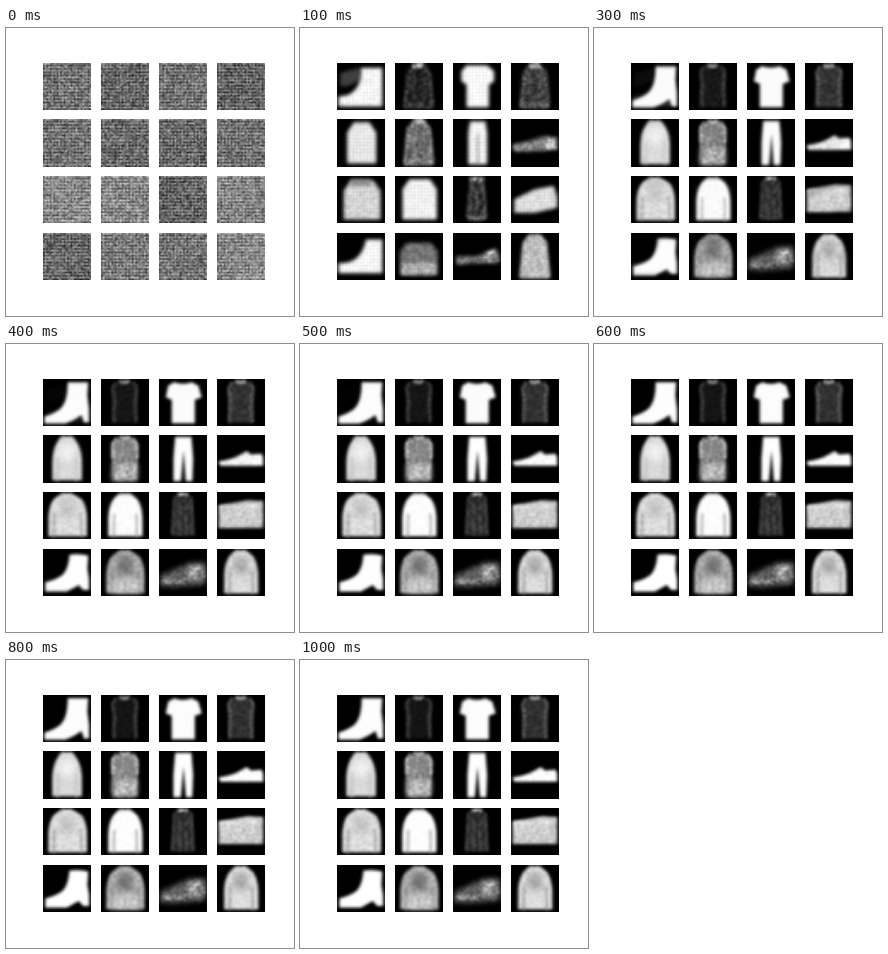
Write an HTML page with a canvas that moves like this. It is 288x288 px and loops after 1.2 s.

```html
<!DOCTYPE html>
<html>
<head>
<meta charset="utf-8">
<style>
  html, body { margin: 0; width: 100%; height: 100%; overflow: hidden; background: #fff; }
  canvas { display: block; }
</style>
</head>
<body>
<canvas id="stage" width="288" height="288"></canvas>
<script>
const N = 28, FINE = 4, STEP = 100, LOOP = 1200, LAST = 10;
const ctx = document.getElementById('stage').getContext('2d');

function square(size) {
  const canvas = document.createElement('canvas');
  canvas.width = canvas.height = size;
  return canvas.getContext('2d', { willReadFrequently: true });
}
const cell = square(N), pen = square(N * FINE);

// Layer: [path, grey, line width, extra blur]; without a width the path is filled.
const tee = 'M9 2Q14 4 19 2L23 4L25 11L21 12.5V26.5H7.5V12.5L4 11L5.5 4Z';
const collar = 'M11 1.2Q14 3 17 1.2';
const gown = 'M11 2H17L20 6L22 26H6L8 6Z';
const dress = (body, edge, neck) => [
  [gown, body], [gown, edge, 1.2], ['M7 24H21M11 6V22M17 6V22', edge * .7, 1], ['M11 1.5H17', neck, 2]];
const darkTee = (body, edge, neck) => [
  ['M9 2H19L22 5L21 26H7L6 5Z', body],
  ['M9 2L7 5L8 13L7.5 26M19 2L21 5L20 13L20.5 26', edge, 1.4], [collar, neck, 1.6]];
const sweater = (left, right, grey, crease, chest = grey) => [
  [`M10 1.5H18L${right - 3} 4.5Q${right} 9 ${right} 17V26.5H${left}V17Q${left} 9 ${left + 3} 4.5Z`, grey],
  ['M10 5H18L19 15H9Z', chest, 0, 1.2],
  [`M${left + 3.5} 13L${left + 3.2} 27M${right - 3.5} 13L${right - 3.2} 27`, crease, 1],
  [collar, Math.min(255, grey + 35), 1.2]];
const blob = (left, right, grey, top = 2) => [
  [`M${left + 4} ${top}H${right - 4}L${right} ${top + 6}V26H${left}V${top + 6}Z`, grey]];

// Tile: first pose, final pose, first grain, final grain, base grey of the noise.
const tiles = [
  [[['M2 6L13 3L14 10L6 14H2Z', 65], ['M14 3H26.5V26H1V20Q12 20 14 8Z', 250]],
   [['M14.5 2H26.5L26 10L27 18V26H24L22.5 21.5Q18 25 13 26.7H1V22.5Q7 20.5 10 18Q14.5 14 14.5 2Z', 253]], .05, 0, 118],
  [dress(28, 115, 235), darkTee(20, 78, 165), .6, .3, 105],
  [[['M8 1.5H20L24 5V11L21 13V26.5H8V13L5 11V5Z', 252]], [[tee, 252]], .03, 0, 118],
  [dress(55, 150, 250), darkTee(48, 100, 195), .5, .25, 102],

  [blob(6, 23, 235), sweater(5.5, 22.8, 218, 190, 240), .04, .03, 118],
  [dress(100, 225, 255),
   [['M9 2H19L22 5L21 26.5H7L6 5Z', 135], ['M7 17H21V26.5H7Z', 195, 0, .8],
    ['M9 2L7 6V14M19 2L21 6V14', 205, 1.3], ['M11 19V26M17 19V26', 150, 1], [collar, 235, 1.6]], .35, .2, 108],
  [[['M10 1.5H19L20 8V26.5H9V8Z', 248], ['M14.5 9V27', 130, 1]],
   [['M9.5 1.2H19L20 14L19.5 27H15.8L14.4 9L12.8 27H8.5V14Z', 255]], .04, 0, 108],
  [[['M1 15L10 13L20 10L27 11V18L12 19H2Z', 135], ['M20 12H26V17H20Z', 210], ['M2 17H10', 160, 2]],
   [['M1 15.5Q8 14.5 12 12.5L17.5 9.5L20 11.5L26 11L27 13V18H2Z', 255]], .3, .04, 118],

  [blob(4, 25.5, 215, 3).concat([['M8 2H20V6H8Z', 140]]), sweater(3.2, 25.8, 222, 145, 195), .09, .06, 140],
  [blob(4.5, 24.5, 245), sweater(4.3, 24.3, 254, 150), .04, .02, 140],
  [[['M10 2H18L20 26H8Z', 32], ['M11 3L9 25M17 3L19 25M14 7V21', 125, 1.2], ['M10 2H18', 235, 1.8], ['M9 25H19', 180, 1.8]],
   [['M9 2H19L21 26H7Z', 42], ['M9 3L8 26M19 3L20 26M12 8V26M16 8V26', 85, 1], ['M11 1.5H17', 220, 1.6]], .5, .3, 102],
  [[['M2 14L14 8L25 6L27 12V19L14 22H2Z', 225]],
   [['M1 8L10 6.5L18 5L27 5.5V21.5H1Z', 205], ['M2 9H26', 220, 2]], .07, .12, 135],

  [[['M17 4H26.5V24H1V18Q14 19 17 4Z', 250]],
   [['M15.5 3.5Q21 2.5 26.5 4L26 12L27 18V24.5H23.5L21 21.5L14 25.5H1.5V20Q9 18 12 15Q15 11 15.5 3.5Z', 255]], .04, 0, 106],
  [[['M7 6H21L25 11V25H3V11Z', 120], ['M4 18H24V25H4Z', 180]],
   sweater(3.2, 25.5, 180, 130, 115).concat([['M7 19H22V26H7Z', 212, 0, .8], ['M10 18V25M14 18V25M18 18V25', 170, .9]]), .2, .1, 128],
  [[['M2 14L14 14L25 9L27 13V18H13L2 19Z', 125], ['M20 11H25V17H20Z', 185]],
   [['M1 16L10 12L18 8.5L27 8V21L12 22.5H1Z', 95, 0, .8], ['M17 10H26V19H17Z', 165, 0, .8], ['M2 19.5H15', 155, 2]], .4, .35, 118],
  [[[gown, 200], [gown, 240, 1.5], ['M12 6V23M16 6V23', 165, 1]],
   sweater(4.2, 24.2, 222, 140, 170), .15, .06, 138]
];

const hash = (a, b = 0) => {
  let h = Math.imul(a + 1, 374761393) + Math.imul(b + 1, 668265263);
  h = Math.imul(h ^ h >>> 13, 1274126177);
  return ((h ^ h >>> 16) >>> 0) / 4294967296;
};
const mix = (a, b, k) => a + (b - a) * k;
const softHash = (a, b) => (hash(a, b) + hash(a + 1, b) + hash(a + N, b) + hash(a + N + 1, b)) / 4;

// Paints the layers finely and returns the N by N greys.
function trace(layers, blur) {
  pen.setTransform(FINE, 0, 0, FINE, 0, 0);
  pen.filter = 'none';
  pen.fillStyle = '#000';
  pen.fillRect(0, 0, N, N);
  for (const [d, grey, width, extra = 0] of layers) {
    const path = new Path2D(d);
    pen.filter = `blur(${(blur + extra) * FINE}px)`;
    pen.fillStyle = pen.strokeStyle = `rgb(${grey},${grey},${grey})`;
    pen.lineWidth = width || 1;
    width ? pen.stroke(path) : pen.fill(path);
  }
  const { data } = pen.getImageData(0, 0, N * FINE, N * FINE);
  const at = p => ((p / N | 0) * FINE + FINE / 2) * N * FINE + p % N * FINE + FINE / 2;
  return Array.from({ length: N * N }, (_, p) => data[at(p) * 4]);
}

const poses = tiles.map(([first, final]) => [trace(first, 1.1), trace(final, .75)]);

function paintTile(i, step) {
  const [, , grain0, grain1, base] = tiles[i];
  const [first, final] = poses[i];
  const k = 1 - Math.exp(-.85 * (step - 1));
  const image = cell.createImageData(N, N);
  for (let p = 0; p < N * N; p++) {
    const x = p % N, y = p / N | 0, id = i * N * N + p;
    let v;
    if (step === 0) {
      v = base + (y & 1 ? -22 : 18) + (x & 1 ? 10 : -10) + (hash(id) - .5) * 95;
    } else {
      const rough = mix(softHash(id, 0), softHash(id, step), .25) * 3 - 1.5;
      const weave = x & y & 1 ? -.06 * (1 - k) : 0;
      v = mix(first[p], final[p], k) * (1 + rough * mix(grain0, grain1, k) + weave);
    }
    image.data.fill(v, p * 4, p * 4 + 3);
    image.data[p * 4 + 3] = 255;
  }
  cell.putImageData(image, 0, 0);
  const row = i >> 2;
  const top = Math.floor(35 + 56.7 * row), bottom = Math.floor(82.3 + 56.7 * row);
  ctx.drawImage(cell.canvas, 37 + 58 * (i % 4), top, 48, bottom - top);
}

let shown = -1;
function draw(now) {
  const step = Math.min(LAST, Math.floor(now % LOOP / STEP));
  if (step !== shown) {
    tiles.forEach((_, i) => paintTile(i, step));
    shown = step;
  }
}

const start = performance.now();
function tick() {
  draw(performance.now() - start);
  requestAnimationFrame(tick);
}
tick();
</script>
</body>
</html>
```
